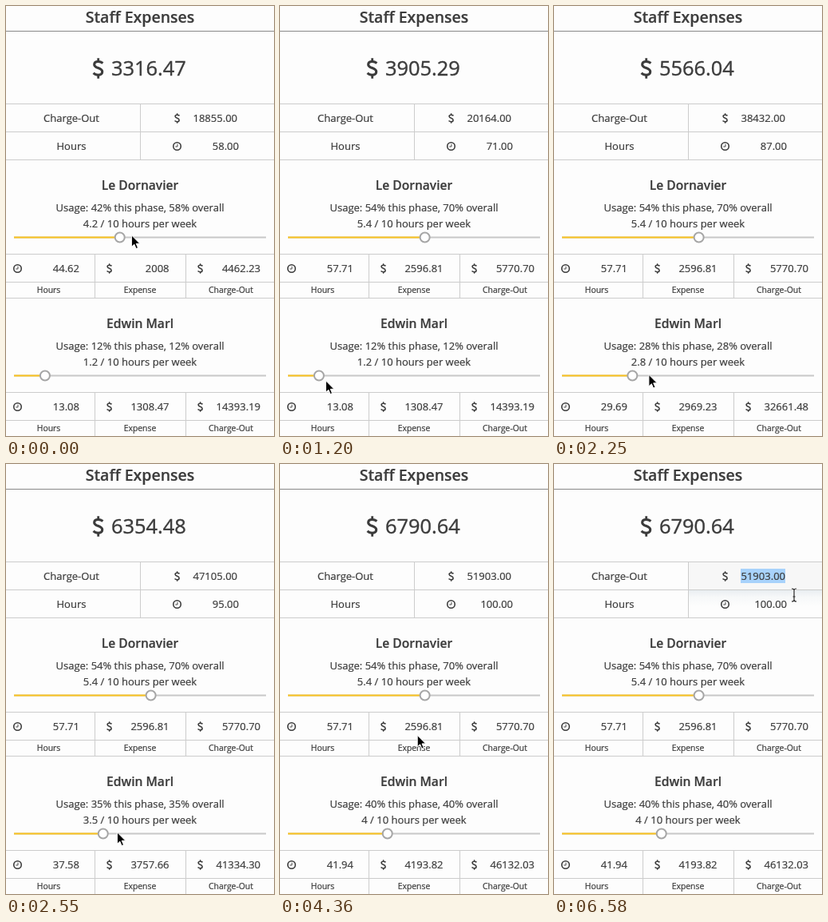
An HTML page that plays this animation: 336 px wide and 538 px high, repeating every 8000 ms.

```html
<!DOCTYPE html>
<html lang="en">
<head>
<meta charset="utf-8">
<title>Staff Expenses</title>
<style>
  html, body { margin: 0; width: 100%; height: 100%; overflow: hidden; background: #fdfdfd; }
  svg { display: block; width: 336px; height: 538px; }
  text { font: 13px "Open Sans", "Noto Sans", sans-serif; fill: #3c3c3c; stroke: #3c3c3c; stroke-width: .22px; }
  .mid { text-anchor: middle; }
  .end { text-anchor: end; }
  .title { font-size: 19.5px; font-weight: 600; }
  .name { font-size: 15.6px; font-weight: 600; }
  .total { font-size: 25.4px; stroke-width: .4px; }
  .label { font-size: 10.4px; }
  .rule { fill: none; stroke: #ccc; }
  .icon { fill: none; stroke: #3c3c3c; }
</style>
</head>
<body>
<svg viewBox="0 0 336 538">
  <defs>
    <linearGradient id="shade" x1="0" y1="0" x2="0" y2="1">
      <stop offset="0" stop-color="#e4eaee"/>
      <stop offset=".25" stop-color="#f5f7f8"/>
      <stop offset=".6" stop-color="#fdfdfd"/>
    </linearGradient>
    <g id="dollar" class="icon">
      <path stroke-width="1.7" d="M3.2-3.5C2.1-4.3 1.1-4.6 .1-4.6C-1.6-4.6-2.6-3.8-2.6-2.6C-2.6 .3 2.8-.8 2.8 2.3C2.8 3.7 1.6 4.5 0 4.5C-1.2 4.5-2.4 4-3.2 3.2"/>
      <path stroke-width="1.5" d="M.1-6.8V-4.6M.1 4.5V6.8"/>
    </g>
    <g id="clock" class="icon">
      <circle r="5.1" stroke-width="1.7"/>
      <path stroke-width="1" d="M.5-2.9V.5H-2.4"/>
    </g>
    <path id="bar" d="M-3-8Q0-8 0-6Q0-8 3-8M0-6V6M-3 8Q0 8 0 6Q0 8 3 8M-1.5 2H1.5"/>
  </defs>

  <text class="mid title" x="168" y="21">Staff Expenses</text>
  <path class="rule" style="stroke:#888" d="M0 31.5H336"/>

  <use href="#dollar" transform="translate(115.5 78) scale(1.857)"/>
  <text class="total" id="total" x="132" y="87"></text>

  <rect id="focus" x="169" y="123" width="167" height="34" fill="#f7f7f7"/>
  <rect id="hoverTop" x="169" y="123" width="167" height="34" fill="url(#shade)"/>
  <rect id="hoverLow" x="169" y="158" width="167" height="34" fill="url(#shade)"/>
  <path class="rule" d="M0 122.5H336M0 157.5H336M0 192.5H336M168.5 122V192"/>
  <rect id="mark" x="234" y="131" height="18" fill="#a8d2fb"/>
  <text class="mid" x="82" y="145">Charge-Out</text>
  <text class="mid" x="82" y="180">Hours</text>
  <use href="#dollar" transform="translate(214.5 140.5) scale(.93)"/>
  <use href="#clock" transform="translate(214.5 175.5) scale(.93)"/>
  <text class="end" id="charge" x="290" y="145"></text>
  <text class="end" id="hours" x="292" y="180"></text>

  <g id="staff"></g>

  <g id="arrow">
    <path transform="translate(.4 -1.2)" stroke="#fff" d="M0 0V14.5L3.4 11.4L5.7 16.8L8.1 15.7L5.8 10.5H10.4Z"/>
  </g>
  <g id="beam" fill="none">
    <use href="#bar" stroke="#fff" stroke-width="2.4"/>
    <use href="#bar" stroke="#222" stroke-width="1.2"/>
  </g>
</svg>

<script>
const LOOP = 8000, STEP = 150, LEFT = 10, WIDTH = 316, FULL_HOURS = 106.25;

// The screen refreshes every STEP within these spans and rests between them
const bursts = [
  [150, 450], [900, 1800], [1950, 2550], [2880, 2880],
  [3330, 3620], [3920, 4960], [5100, 5840], [6440, 6580]
];

// Moves are: start time, end time, new values
const pointer = {
  start: [157, 288],
  moves: [
    [0, 450, 184, 289], [750, 1200, 57, 470], [1200, 1500, 50, 462],
    [1650, 1950, 98, 463], [1950, 2550, 139, 462], [2880, 3480, 134, 462],
    [3770, 4960, 234, 141], [5400, 5840, 291, 142], [6300, 6580, 301, 164]
  ]
};

// Values are hours and percent of the phase
const people = [
  { name: "Le Dornavier", y: 0, cost: 45, fee: 100, other: 16,
    start: [44.62228, 42],
    moves: [[0, 450, 57.70699, 54]] },
  { name: "Edwin Marl", y: 173, cost: 100, fee: 1100, other: 0,
    start: [13.08472, 12],
    moves: [[1780, 1950, 21.80787, 21], [1950, 2550, 37.57664, 35],
            [2550, 2880, 44.96, 43], [2880, 3480, 42.94473, 41],
            [3480, 3620, 41.938213, 40]] }
];

const $ = id => document.getElementById(id);
const clamp = v => Math.max(0, Math.min(1, v));

const card = (p, i) => `<g transform="translate(0 ${p.y})">
  <text class="mid name" x="168" y="230">${p.name}</text>
  <text class="mid" id="usage${i}" x="168" y="257"></text>
  <text class="mid" id="week${i}" x="168" y="277"></text>
  <rect x="${LEFT}" y="288.5" width="${WIDTH}" height="2" fill="#c8c8c8"/>
  <rect id="fill${i}" x="${LEFT}" y="288.5" height="2" fill="#fbc31f"/>
  <circle id="knob${i}" cy="289.5" r="6" fill="#fff" stroke="#a6a6a6" stroke-width="2"/>
  <path class="rule" d="M0 310.5H336M0 345.5H336M0 365.5H336M111.5 310V365M225.5 310V365"/>
  <use href="#clock" transform="translate(14.5 328.5) scale(.93)"/>
  <use href="#dollar" transform="translate(129.5 328.5) scale(.93)"/>
  <use href="#dollar" transform="translate(243.5 328.5) scale(.93)"/>
  <text class="end" id="time${i}" x="92" y="333"></text>
  <text class="end" id="cost${i}" x="204.5" y="333"></text>
  <text class="end" id="fee${i}" x="319" y="333"></text>
  <text class="mid label" x="53.5" y="359">Hours</text>
  <text class="mid label" x="168" y="359">Expense</text>
  <text class="mid label" x="282" y="359">Charge-Out</text>
</g>`;
$("staff").innerHTML = people.map(card).join("");

// Latest refresh at or before t
function snap(t) {
  const burst = bursts.filter(b => b[0] <= t).pop();
  if (!burst) return 0;
  const [from, to] = burst;
  return t >= to ? to : from + Math.floor((t - from) / STEP) * STEP;
}

function sample({ start, moves }, t) {
  let now = start;
  for (const [from, to, ...goal] of moves) {
    const u = clamp((t - from) / (to - from));
    now = now.map((v, i) => v * (1 - u) + goal[i] * u);
  }
  return now;
}

function put(id, value) {
  const el = $(id);
  if (el.textContent !== value) el.textContent = value;
}

function draw(now) {
  const t = snap(now % LOOP);
  let hours = 0, cost = 0, fee = 0;

  people.forEach((p, i) => {
    const [h, percent] = sample(p, t);
    const pct = Math.round(percent);
    const span = WIDTH * h / FULL_HOURS;
    put("usage" + i, `Usage: ${pct}% this phase, ${pct + p.other}% overall`);
    put("week" + i, `${pct / 10} / 10 hours per week`);
    put("time" + i, h.toFixed(2));
    put("cost" + i, String(+(h * p.cost).toFixed(2)));
    put("fee" + i, (h * p.fee).toFixed(2));
    $("fill" + i).setAttribute("width", span);
    $("knob" + i).setAttribute("cx", LEFT + span);
    hours += h;
    cost += h * p.cost;
    fee += h * p.fee;
  });

  put("total", cost.toFixed(2));
  put("charge", Math.round(fee).toFixed(2));
  put("hours", Math.round(hours).toFixed(2));

  const [x, y] = sample(pointer, t);
  const typing = t >= 4900;
  $("arrow").setAttribute("transform", `translate(${x} ${y})`);
  $("beam").setAttribute("transform", `translate(${x} ${y})`);
  $("arrow").style.display = typing ? "none" : "";
  $("beam").style.display = typing ? "" : "none";

  $("mark").setAttribute("width", 56 * clamp((t - 5400) / 430));
  $("focus").style.opacity = t >= 6400 ? 1 : 0;
  $("hoverTop").style.opacity = t < 6500 ? clamp((t - 4810) / 450) : 0;
  $("hoverLow").style.opacity = t >= 6500 ? 0.8 : 0;
}

const start = performance.now();
function loop() {
  draw(performance.now() - start);
  requestAnimationFrame(loop);
}
loop();
</script>
</body>
</html>
```
